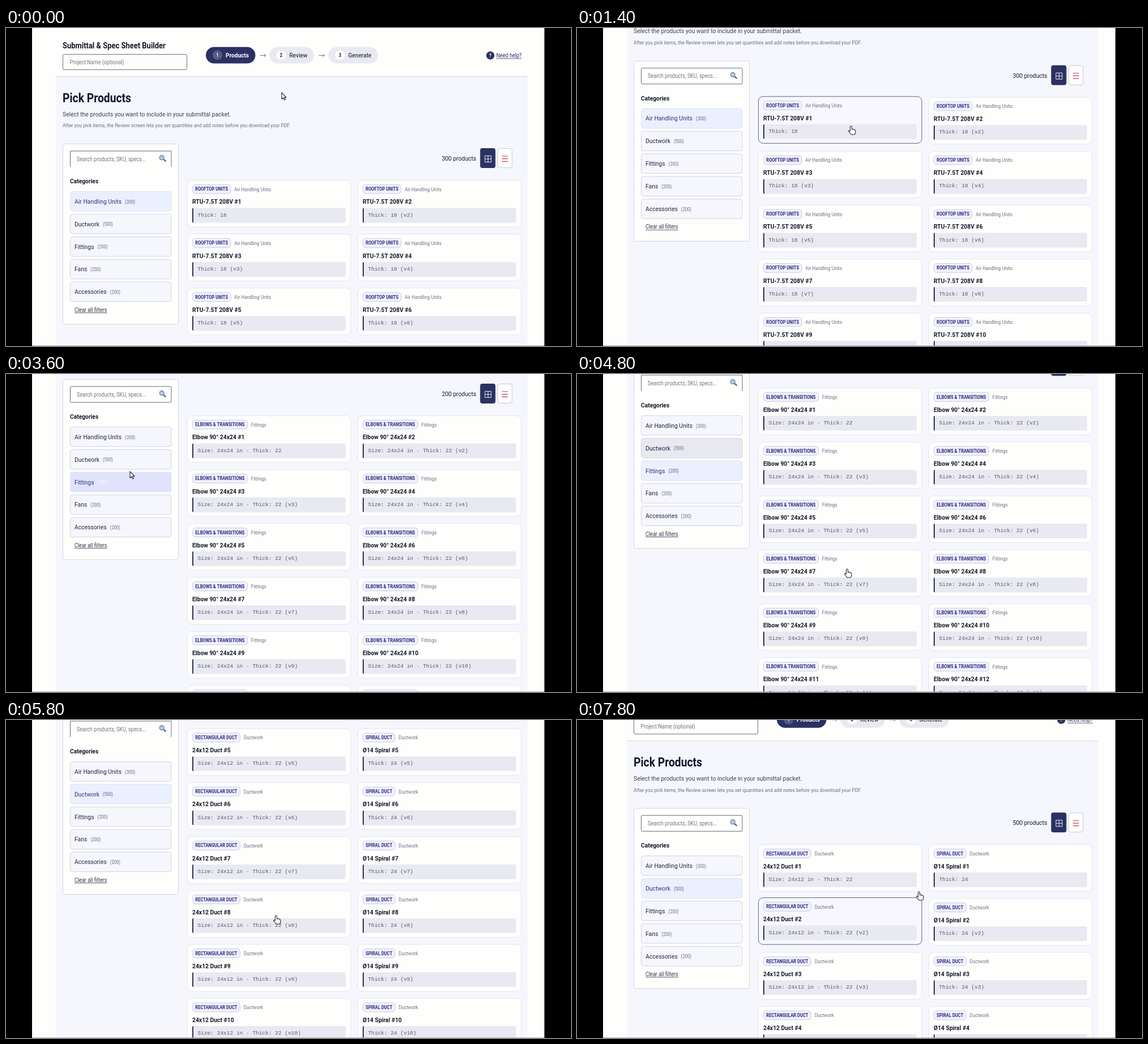
An HTML page with a canvas that plays this animation: 998x561 px, repeating every 8000 ms.

```html
<!DOCTYPE html>
<html lang="en">
<head>
<meta charset="utf-8">
<title>Submittal builder</title>
<style>
  html, body { margin: 0; width: 100%; height: 100%; overflow: hidden; background: #000; }
  canvas { display: block; }
</style>
</head>
<body>
<canvas id="stage" width="998" height="561"></canvas>
<script>
const ctx = document.getElementById('stage').getContext('2d');

const LOOP = 8000, STEP = 200;
const CONDENSE = 0.885;           // one condensed cut for all sans text
const ROW_PITCH = 95.15, STICKY_SHIFT = 215;
const WHITE = '#fefefd', NAVY = '#2b3163', INK = '#171a2b', GREY = '#6c707c';

const categories = [
  ['Air Handling Units', 300], ['Ductwork', 500], ['Fittings', 200],
  ['Fans', 200], ['Accessories', 200],
];

const pairNumber = (row, col) => row * 2 + col + 1;
const products = {
  0: (row, col) => ['ROOFTOP UNITS', 'RTU-7.5T 208V', 'Thick: 18', pairNumber(row, col)],
  1: (row, col) => col
    ? ['SPIRAL DUCT', 'Ø14 Spiral', 'Thick: 24', row + 1]
    : ['RECTANGULAR DUCT', '24x12 Duct', 'Size: 24x12 in · Thick: 22', row + 1],
  2: (row, col) => ['ELBOWS & TRANSITIONS', 'Elbow 90° 24x24', 'Size: 24x24 in · Thick: 22', pairNumber(row, col)],
};

// Keyframes: time, value(s)
const scrollKeys = [[0, 0], [400, 0], [1400, 146.25], [1600, 146.25], [2200, 195], [4600, 195],
  [4800, 243.75], [5000, 243.75], [5800, 633.75], [6000, 633.75], [6800, 195], [7000, 195], [7800, 48.75]];
const cursorKeys = [[0, 487, 114], [600, 487, 114], [1400, 484, 173], [1800, 484, 173], [2600, 190, 187],
  [2800, 190, 187], [3200, 219, 172], [3600, 219, 172], [4200, 165, 148], [4600, 165, 148],
  [4800, 477, 344], [5800, 477, 345], [6400, 473, 349], [7000, 473, 349], [7800, 604, 303]];

function sample(keys, t) {
  const next = keys.findIndex(k => k[0] > t);
  if (next < 0) return keys[keys.length - 1].slice(1);
  const a = keys[next - 1], b = keys[next];
  const p = (t - a[0]) / (b[0] - a[0]);
  return a.slice(1).map((v, i) => v + (b[i + 1] - v) * p);
}

const between = (t, from, to) => t >= from && t < to;

function stateAt(t) {
  return {
    scroll: sample(scrollKeys, t)[0],
    cursor: sample(cursorKeys, t),
    selected: t < 2800 ? 0 : t < 5000 ? 2 : 1,
    hoverCategory: between(t, 2600, 4000) ? 2 : between(t, 4200, 5000) ? 1 : -1,
    hoverCard: between(t, 1200, 2000) ? 0 : t >= 7600 ? 2 : -1,
    hand: between(t, 1200, 3200) || between(t, 4200, 6200) || t >= 7400,
  };
}

function box(x, y, w, h, r, fill, stroke) {
  ctx.beginPath();
  ctx.roundRect(x, y, w, h, r);
  if (fill) { ctx.fillStyle = fill; ctx.fill(); }
  if (stroke) { ctx.strokeStyle = stroke; ctx.lineWidth = 1; ctx.stroke(); }
}

function disc(x, y, r, fill) {
  ctx.beginPath();
  ctx.arc(x, y, r, 0, Math.PI * 2);
  ctx.fillStyle = fill;
  ctx.fill();
}

function lines(color, width, ...paths) {
  ctx.beginPath();
  for (const [x, y, ...rest] of paths) {
    ctx.moveTo(x, y);
    for (let i = 0; i < rest.length; i += 2) ctx.lineTo(rest[i], rest[i + 1]);
  }
  ctx.strokeStyle = color;
  ctx.lineWidth = width;
  ctx.stroke();
}

// Draws text centred vertically on midY and returns its width.
function text(str, x, midY, size, color, weight = 400, align = 'left') {
  ctx.font = `${weight} ${size}px Roboto, sans-serif`;
  ctx.textAlign = align;
  ctx.fillStyle = color;
  ctx.save();
  ctx.translate(x, midY + size * 0.36);
  ctx.scale(CONDENSE, 1);
  ctx.fillText(str, 0, 0);
  ctx.restore();
  return ctx.measureText(str).width * CONDENSE;
}

function link(str, x, midY, color) {
  const width = text(str, x, midY, 10.25, color);
  lines(color, 0.8, [x, midY + 5.5, x + width, midY + 5.5]);
}

function stepPill(number, label, x, width, active) {
  box(x, 33.5, width, 29, 14.5, active ? NAVY : '#e9e9f1');
  disc(x + 20.5, 48, 8.5, active ? '#555b84' : WHITE);
  text(number, x + 20.5, 48, 8.6, active ? '#fff' : INK, 700, 'center');
  text(label, x + 35, 48, 11.4, active ? '#fff' : '#3b3f52', active ? 700 : 500);
}

function drawHeader() {
  ctx.fillStyle = WHITE;
  ctx.fillRect(88, 0, 833, 86);
  lines('#d5d5de', 1, [88, 85.5, 921, 85.5]);
  text('Submittal & Spec Sheet Builder', 100, 31, 14.65, INK, 700);
  box(100.5, 46.5, 219, 27, 2, WHITE, '#71727a');
  text('Project Name (optional)', 112.5, 60, 10.25, '#75767f');
  stepPill('1', 'Products', 353, 87.5, true);
  stepPill('2', 'Review', 465.5, 78.5);
  stepPill('3', 'Generate', 569.5, 87.5);
  for (const x of [449, 552.5])
    lines('#70737f', 1, [x, 48.5, x + 10, 48.5], [x + 7, 46, x + 10, 48.5, x + 7, 51]);
  disc(855.5, 48.5, 7.2, NAVY);
  text('?', 855.5, 48.5, 9, '#fff', 700, 'center');
  link('Need help?', 866, 48.5, NAVY);

  text('Pick Products', 100, 123, 21.8, '#12172b', 700);
  text('Select the products you want to include in your submittal packet.', 100, 151.5, 11.75, '#3d4050');
  text('After you pick items, the Review screen lets you set quantities and add notes before you download your PDF.',
    100, 172, 9.5, GREY);
}

function drawCategory(index, { selected, hoverCategory }) {
  const [name, count] = categories[index];
  const y = 288.5 + index * 39.9;
  const isSelected = index === selected, isHover = index === hoverCategory;
  const fill = isSelected ? (isHover ? '#e1e3fc' : '#ebf0fe') : isHover ? '#e8e8f1' : '#f6f6fd';
  box(113.5, y, 178.5, 34.5, 4, fill, isSelected ? '#dde2f6' : '#d3d4de');
  const width = text(name, 121, y + 17, 11.75, isSelected ? '#34357c' : '#25283a');
  const countColor = isSelected ? (isHover ? '#f6f6ff' : '#5d60a0') : GREY;
  text(`(${count})`, 121 + width + 6, y + 18, 8.6, countColor);
}

function drawSidebar(state, shift) {
  box(100.5, 204.5, 204, 318, 3, WHITE, '#d3d4e0');
  const openBottom = shift === 0 || shift === STICKY_SHIFT;
  box(113.5, 217, 178.5, 28, 2, WHITE, openBottom ? null : '#6a6b73');
  if (openBottom) lines('#6a6b73', 1, [113.5, 245, 113.5, 217, 292, 217, 292, 245]);
  text('Search products, SKU, specs...', 125, 231, 10.25, '#75767f');
  lines('#4d5058', 2, [278, 231.5, 282.5, 235.5]);
  disc(275.2, 228.7, 4.6, '#6f8099');
  disc(275.2, 228.7, 3.3, '#b4c9e6');
  text('Categories', 113, 270, 11.6, INK, 700);
  categories.forEach((_, i) => drawCategory(i, state));
  link('Clear all filters', 121, 497, '#34374a');
}

function drawToolbar(count) {
  text(`${count} products`, 830.5, 230, 11.7, INK, 400, 'right');
  box(837.5, 212, 27, 35, 4, NAVY);
  lines('#e8e9f2', 1, [846, 225.5, 857, 225.5, 857, 236.5, 846, 236.5, 846, 225.5],
    [851.5, 225.5, 851.5, 236.5], [846, 231, 857, 231]);
  box(868.5, 212.5, 25.5, 34, 4, WHITE, '#c8c9d4');
  lines('#bd3a60', 1.2, [876, 226, 886.5, 226], [876, 230.7, 886.5, 230.7], [876, 235.4, 886.5, 235.4]);
}

function drawCard(row, col, { selected, hoverCard }) {
  const [tag, name, spec, number] = products[selected](row, col);
  const hovered = hoverCard === row * 2 + col;
  ctx.save();
  ctx.translate(320 + col * 301, 268.5 + row * ROW_PITCH - (hovered ? 1.4 : 0));
  box(0.5, 0, 288.5, 82.5, 8, hovered ? '#f7f7fd' : WHITE, hovered ? '#62647f' : '#e5e5f1');

  ctx.font = '700 8.55px Roboto, sans-serif';
  const tagWidth = ctx.measureText(tag).width * CONDENSE + 10;
  box(9.3, 7.7, tagWidth, 16, 5, '#f1f1fd', '#cbcce8');
  text(tag, 14.3, 15.7, 8.55, '#2f2a80', 700);
  text(categories[selected][0], 9 + tagWidth + 6.5, 15.7, 9.2, GREY);
  text(`${name} #${number}`, 9, 37.7, 11.7, INK, 700);

  box(9, 49, 271, 26, 3, '#e9e9f2');
  box(9, 49, 2, 26, [2, 0, 0, 2], '#2d2e55');
  ctx.font = '9.5px "Liberation Mono", monospace';
  ctx.textAlign = 'left';
  ctx.fillStyle = '#575965';
  ctx.fillText(number > 1 ? `${spec} (v${number})` : spec, 18.5, 64);
  ctx.restore();
}

function drawCursor(x, y, hand) {
  const outline = hand
    ? 'M-1.5 1Q0-1 1.5 1V6Q3 4.5 4 6.2Q5.7 5 6.3 7Q7.8 6.5 8 8.5V11Q7.5 13 6.5 15H0Q-2-.5-4.5 8.5Q-4 6.8-1.5 9Z'
    : 'M0 0V11.5L2.7 9L4.5 13L6.4 12.2L4.6 8.4H8Z';
  const path = new Path2D(hand ? outline.replace('Q-2-.5-4.5 8.5', 'Q-2 12-4.5 9') : outline);
  ctx.save();
  ctx.translate(x, y);
  ctx.lineWidth = 1.1;
  ctx.lineJoin = 'round';
  ctx.fillStyle = '#fff';
  ctx.strokeStyle = '#26272e';
  ctx.fill(path);
  ctx.stroke(path);
  ctx.restore();
}

function scrolled(offset, draw) {
  ctx.save();
  ctx.translate(0, -offset);
  draw();
  ctx.restore();
}

function draw(t) {
  const state = stateAt(t);
  const { scroll, selected, cursor, hand } = state;
  ctx.fillStyle = '#000';
  ctx.fillRect(0, 0, 998, 561);
  ctx.fillStyle = WHITE;
  ctx.fillRect(46, 0, 905, 561);
  ctx.fillStyle = '#f6f6fd';
  ctx.fillRect(88, 0, 833, 561);

  scrolled(scroll, () => {
    drawHeader();
    drawToolbar(categories[selected][1]);
    const first = Math.max(0, Math.floor((scroll - 352) / ROW_PITCH));
    for (let row = first; row < first + 9; row++)
      for (const col of [0, 1]) drawCard(row, col, state);
  });
  const shift = Math.min(scroll, STICKY_SHIFT);
  scrolled(shift, () => drawSidebar(state, shift));

  ctx.fillStyle = '#b9b9bf';
  ctx.fillRect(46, 560, 905, 1);
  drawCursor(cursor[0], cursor[1], hand);
}

function tick() {
  const t = performance.now() % LOOP;
  draw(Math.floor(t / STEP) * STEP);
  requestAnimationFrame(tick);
}
tick();
</script>
</body>
</html>
```
